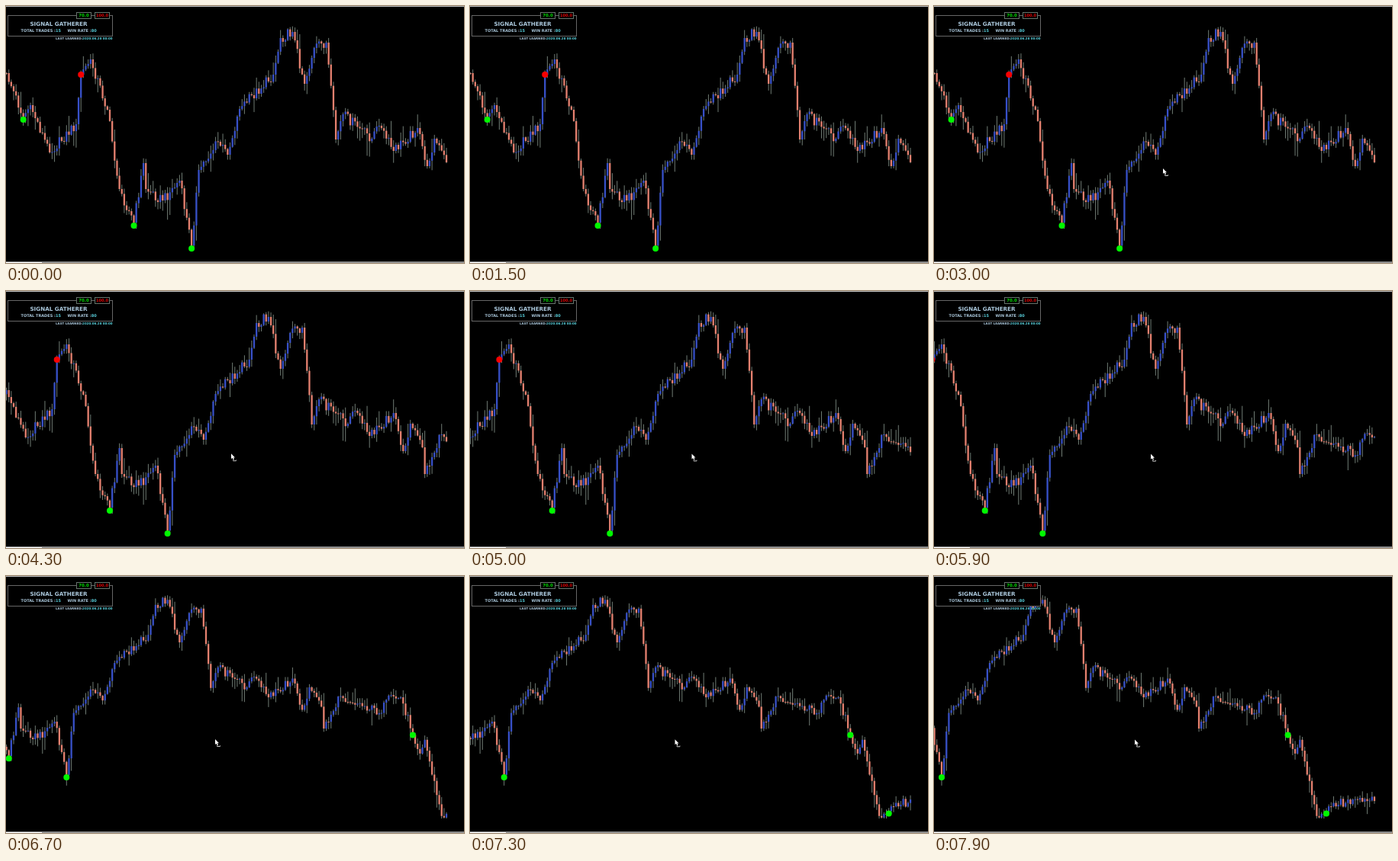
Write an HTML page with a canvas that moves like this. It is 600 px wide and 337 px high and loops after 8 s.

```html
<!DOCTYPE html>
<html lang="en">
<head>
<meta charset="utf-8">
<title>Scrolling candle chart</title>
<style>
html, body { margin: 0; width: 100%; height: 100%; overflow: hidden; background: #000; }
canvas { display: block; }
</style>
</head>
<body>
<canvas id="stage" width="600" height="337"></canvas>
<script>
const ctx = document.getElementById('stage').getContext('2d');
const LOOP = 8000, STEP = 100;
const PITCH = 3.15, LAST_X = 577, VISIBLE = 184, COUNT = 258;
const TOP = 19, BOTTOM = 318;

// Turning points of the price: candle index, height on the stage at scale 1.
const pivots = [
  [0, 88], [7, 145], [10, 130], [18, 192], [29, 155], [31, 90], [35, 70],
  [42, 136], [47, 240], [53, 284], [57, 206], [58, 240], [65, 255], [72, 229],
  [77, 314], [80, 215], [88, 178], [92, 195], [97, 135], [111, 90], [114, 42],
  [119, 34], [124, 102], [128, 55], [133, 48], [137, 175], [140, 142], [152, 174],
  [155, 157], [161, 190], [171, 160], [175, 210], [178, 174], [183, 205], [184, 240],
  [191, 188], [208, 215], [210, 194], [216, 190], [224, 280], [226, 258],
  [233, 380], [237, 372], [240, 359], [257, 356]
];
const sells = [31], buys = [7, 53, 77, 221, 237];
// Time and number of candles scrolled.
const scroll = [[3400, 0], [4300, 10], [5000, 19], [5900, 32], [6700, 52], [7900, 74]];

// Piecewise linear value through a list of [position, value].
function along(points, at) {
  const k = points.findIndex(p => p[0] >= at);
  if (k <= 0) return points[k < 0 ? points.length - 1 : 0][1];
  const [x0, y0] = points[k - 1], [x1, y1] = points[k];
  return y0 + (y1 - y0) * (at - x0) / (x1 - x0);
}

function rand(i, k) {
  const v = Math.sin(i * 12.9898 + k * 78.233) * 43758.5453;
  return v - Math.floor(v);
}

const turning = new Set(pivots.map(p => p[0]));
const trend = i => along(pivots, i);
const closeAt = i => trend(i) + (turning.has(i) ? 0 : (rand(i, 1) - 0.5) * 14);
const wick = (i, k) => 1 + 9 * rand(i, k) ** 1.5 + 20 * rand(i, k + 2) ** 9;

const candles = Array.from({ length: COUNT }, (_, i) => {
  const open = closeAt(Math.max(0, i - 1)), close = closeAt(i);
  const top = Math.min(open, close), bottom = Math.max(open, close);
  return { rising: close < open, top, bottom, high: top - wick(i, 2), low: bottom + wick(i, 3) };
});

function rect(x, y, w, h, color) {
  ctx.fillStyle = color;
  ctx.fillRect(x, y, w, h);
}

function text(str, x, y, size, color, align = 'left') {
  ctx.font = `bold ${size}px "DejaVu Sans", sans-serif`;
  ctx.textAlign = align;
  ctx.fillStyle = color;
  ctx.fillText(str, x, y);
  return x + ctx.measureText(str).width;
}

function box(x, y, w, h, color) {
  rect(x, y, w, h, '#000');
  ctx.strokeStyle = color;
  ctx.lineWidth = 1;
  ctx.strokeRect(x + 0.5, y + 0.5, w - 1, h - 1);
}

function drawChart(last) {
  const first = last - VISIBLE + 1;
  const shown = candles.slice(first, last + 1);
  const lowest = Math.max(...shown.map((_, n) => trend(first + n))) + 4;
  const scale = (BOTTOM - TOP) / (lowest - TOP);
  const xOf = i => LAST_X - (last - i) * PITCH;
  const yOf = v => Math.min(BOTTOM, Math.max(TOP, TOP + (v - TOP) * scale));
  const bar = (x, w, from, to, color) =>
    rect(x - w / 2, yOf(from), w, Math.max(1, yOf(to) - yOf(from)), color);

  shown.forEach((c, n) => {
    const x = xOf(first + n);
    bar(x, 1, c.high, c.low, '#6f7b73');
    bar(x, 2.3, c.top, c.bottom, c.rising ? '#3750c8' : '#e4806f');
  });

  const dot = (i, y, color) => {
    if (i > last) return;
    ctx.fillStyle = color;
    ctx.beginPath();
    ctx.arc(xOf(i), yOf(y), 4, 0, Math.PI * 2);
    ctx.fill();
  };
  sells.forEach(i => dot(i, trend(i), '#f80000'));
  buys.forEach(i => dot(i, trend(i) + 4, '#00f800'));
}

function drawPanel() {
  const pale = '#abc8dc', cyan = '#58d0dc';
  box(2, 12, 138, 28, '#666');
  box(92, 8, 20, 9, '#65736a');
  box(116, 8, 20, 9, '#65736a');
  text('70.0', 102, 14.4, 5.4, '#00e000', 'center');
  text('100.0', 126, 14.4, 5.1, '#e00000', 'center');
  text('SIGNAL GATHERER', 69, 25.6, 7.2, pale, 'center');
  text('15', text('TOTAL TRADES :', 19.5, 33.5, 5, pale), 33.5, 5, cyan);
  text('80', text('WIN RATE :', 80.5, 33.5, 5, pale), 33.5, 5, cyan);
  text('2020.06.28 00:00', text('LAST LEARNED:', 65, 44.4, 4, pale), 44.4, 4, cyan);
}

function drawPointer(x, y) {
  ctx.save();
  ctx.translate(x, y);
  ctx.fillStyle = '#fff';
  ctx.fill(new Path2D('M0 0V7L1.6 5.6L2.8 8.2L4 7.6L2.9 5.2H5Z'));
  rect(2.5, 9, 4, 1, '#ccc');
  rect(2, 8.3, 1, 1, '#ccc');
  rect(6, 8.3, 1, 1, '#ccc');
  ctx.restore();
}

function drawFrame() {
  rect(0, 0, 600, 1, '#c4c4c4');
  rect(0, 335, 600, 2, '#8c8c8c');
  rect(0, 336, 47, 1, '#fff');
}

function draw(time) {
  const shift = along(scroll, time);
  rect(0, 0, 600, 337, '#000');
  drawChart(VISIBLE - 1 + Math.round(shift));
  drawPanel();
  drawFrame();
  if (time >= 2700) drawPointer(300 - shift / 2, 213 + shift / 50);
}

function tick() {
  const time = performance.now() % LOOP;
  draw(Math.floor(time / STEP) * STEP);
  requestAnimationFrame(tick);
}
tick();
</script>
</body>
</html>
```
